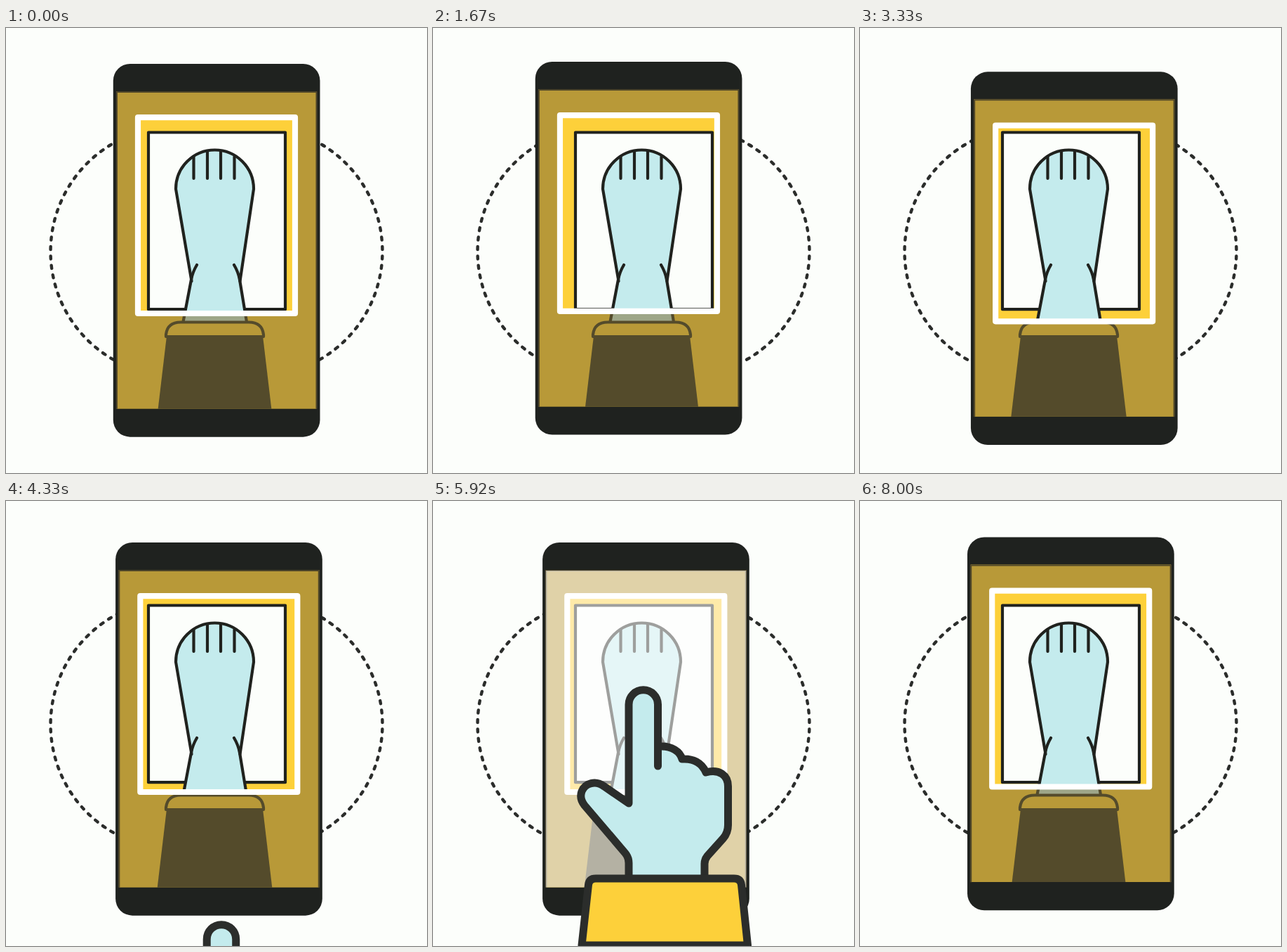
Recreate the animation shown at these times as an HTML page. Size 600 by 633 pixels, loop 8.08 s.

```html
<!DOCTYPE html>
<html lang="en">
<head>
<meta charset="utf-8">
<title>Phone camera</title>
<style>
  html, body { margin: 0; width: 100%; height: 100%; overflow: hidden; background: #fcfefb; }
  svg { display: block; width: 100vw; height: 100vh; }
  .line { stroke: #20221e; stroke-width: 4.2; }
  .bold { stroke: #2b2d2b; stroke-width: 11; }
  .dots { stroke: #2b2d2b; stroke-width: 4.4; stroke-dasharray: 4.2 9.3; stroke-dashoffset: 2; }
  .skin { fill: #c4ebed; }
  .sun { fill: #fdd03a; }
  .none { fill: none; }
</style>
</head>
<body>
<svg viewBox="0 0 600 633" stroke-linecap="round" stroke-linejoin="round">
  <clipPath id="screen"><rect class="phone" x="157.5" y="90" width="285.5" height="451.5"/></clipPath>

  <!-- two overlapping circles, their inner parts hidden by the phone -->
  <g class="none dots">
    <path d="M148 167A177 177 0 0 0 160 475.500"/>
    <path d="M148 167A177 177 0 0 1 180 151"/>
    <path d="M452 167A177 177 0 0 1 440 475.500"/>
    <path d="M452 167A177 177 0 0 0 420 151"/>
  </g>

  <rect class="phone" x="152.8" y="51" width="294.7" height="530.7" rx="24" fill="#1f221f"/>

  <!-- what the camera sees -->
  <g clip-path="url(#screen)">
    <rect class="sun" width="600" height="633"/>
    <rect class="line" x="203" y="148.5" width="195" height="251.7" fill="#fcfefb"/>
    <path class="skin" d="M264 358L252 418H343L333 358Z"/>
    <path class="skin line" d="M264.500 360L242 229A55.500 55.500 0 0 1 353 229L333.500 360"/>
    <path class="line none" d="M272 337Q266 347 264 358L252.500 418M325 337Q331 347 333 358L343 418
      M267.500 183V214M287 175V214M306 175V214M325.500 183V214"/>
    <path d="M229 438H366L390 640H205Z" fill="#20221e"/>
    <path class="sun line" d="M228 439V436Q230 418.500 249 418.500H346Q365 418.500 367 436V439Z"/>
  </g>

  <g class="phone">
    <path fill="#806d38" fill-opacity=".55" fill-rule="evenodd"
      d="M157.500 90H443V541.500H157.500ZM188 127.200V406H412V127.200Z"/>
    <path class="none" d="M158 541V91H442.500V541" stroke="#4f4629" stroke-width="2"/>
    <rect class="none" x="188" y="127.2" width="224" height="278.8" stroke="#fff" stroke-width="8.2"/>
    <rect id="flash" x="157.5" y="91" width="285.5" height="450.5" fill="#fff"/>
  </g>

  <g id="hand">
    <path class="skin bold" d="M320.500 377V289.500A20.700 20.700 0 0 0 279 289.500V430L244 406
      C232 397 217 401 212 413C209 421 212 428 216 433L274 501Q279 507 279 515V540
      H387V516Q387 510 391 505L413.500 480Q420.500 472 420.500 461V406C420.500 390 408 381 389 386
      C383 372 370 366 355 367C352 356 340 349 326 349"/>
    <path class="sun bold" d="M212 632L221.500 546Q222.500 537 232 537H429Q438.500 537 439.500 546L448.500 632Z"/>
  </g>
</svg>
<script>
const LOOP = 8080;
const phone = document.querySelectorAll('.phone');
const hand = document.getElementById('hand');
const flash = document.getElementById('flash');
const linear = p => p;
const easeOut = p => 1 - (1 - p) ** 2;

// Each key: time, x, y, easing towards it
const phonePath = [
  [0, 0, 0], [1250, -15, -14], [2600, 10.5, 21], [4080, 3.3, 8, easeOut],
  [6830, 3.3, 8], [LOOP, 0, 0]
];
const handPath = [
  [0, 8, 370], [4250, 8, 370], [5080, 0, 0], [6920, 0, 0], [7580, 175, 370], [LOOP, 175, 370]
];
// Each key: time, opacity
const flashPath = [[0, 0, 0], [5170, 0, 0], [5500, 0.85, 0], [6750, 0, 0], [LOOP, 0, 0]];

function at(keys, t) {
  const i = keys.findIndex(k => k[0] > t);
  const [t0, x0, y0] = keys[i - 1];
  const [t1, x1, y1, ease = linear] = keys[i];
  const p = ease((t - t0) / (t1 - t0));
  return [x0 + (x1 - x0) * p, y0 + (y1 - y0) * p];
}

const move = (el, [x, y]) => el.setAttribute('transform', `translate(${x} ${y})`);
const start = performance.now();

function draw() {
  const t = (performance.now() - start) % LOOP;
  const pos = at(phonePath, t);
  phone.forEach(el => move(el, pos));
  move(hand, at(handPath, t));
  flash.setAttribute('opacity', at(flashPath, t)[0]);
  requestAnimationFrame(draw);
}
draw();
</script>
</body>
</html>
```
